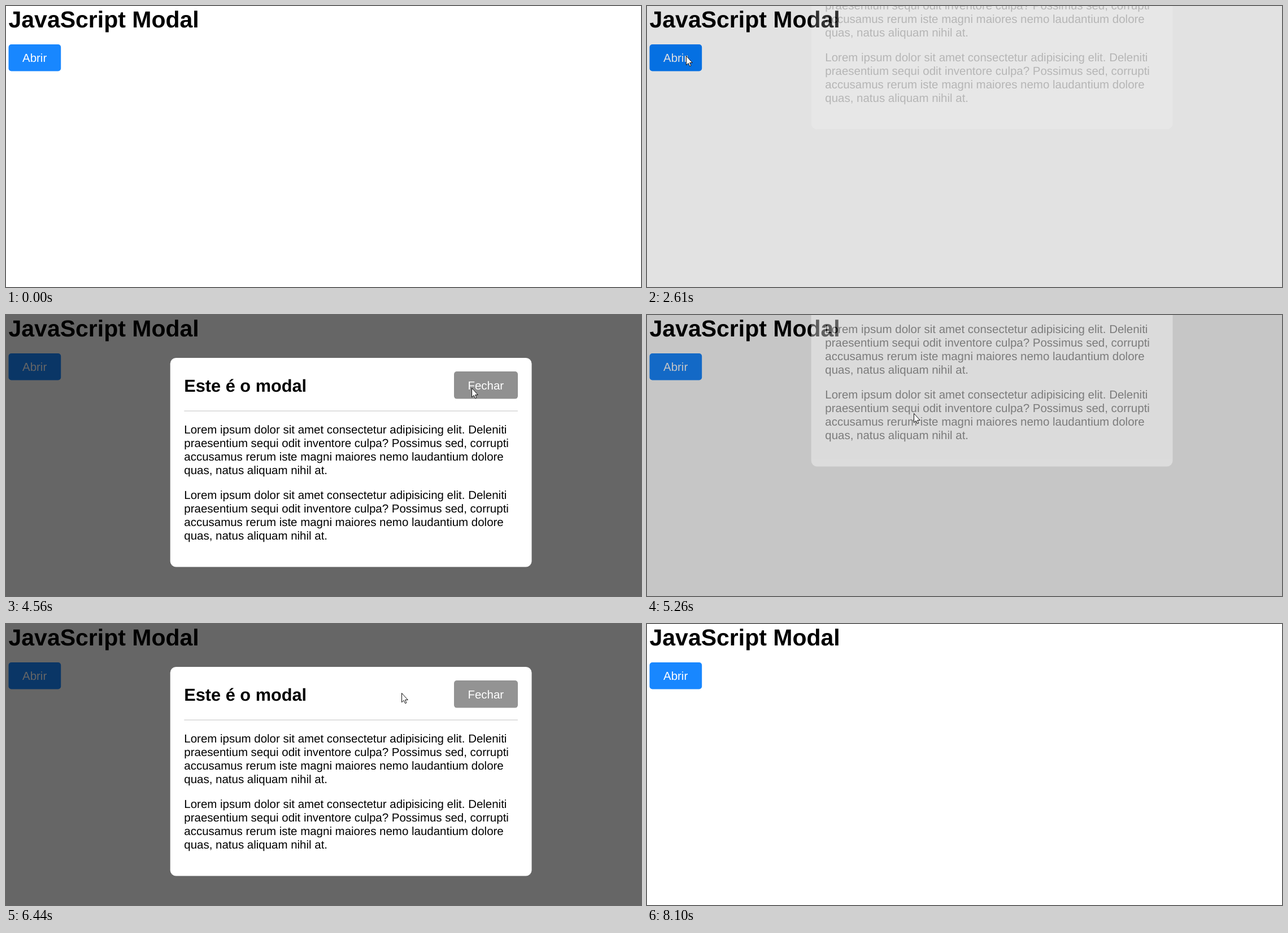
Recreate the animation shown at these times as an HTML page. Size 1124x498 px, loop 9.03 s.

```html
<!DOCTYPE html>
<html lang="pt">
<head>
<meta charset="utf-8">
<title>JavaScript Modal</title>
<style>
html, body { margin: 0; width: 100%; height: 100%; overflow: hidden; background: #fff; }
svg { display: block; width: 1124px; height: 498px; }
text { font: 20.48px "Liberation Sans", Arial, sans-serif; text-rendering: geometricPrecision; }
.h1 { font-size: 41px; font-weight: bold; }
.h2 { font-size: 30.72px; font-weight: bold; }
.label { fill: #fff; }
</style>
</head>
<body>
<svg viewBox="0 0 1124 498">
  <text class="h1" x="4.5" y="38">JavaScript Modal</text>
  <g id="open">
    <rect x="4.5" y="68" width="92.7" height="47.5" rx="5" fill="#007bff"/>
    <text class="label" x="29" y="99">Abrir</text>
  </g>
  <rect id="fade" width="1124" height="498" fill="#000"/>
  <g id="modal">
    <rect x="290.7" y="76" width="639.8" height="370.5" rx="10.2" fill="#fff"/>
    <text class="h2" x="315.3" y="136">Este é o modal</text>
    <g id="close">
      <rect x="793" y="100" width="113" height="48.6" rx="5" fill="#888"/>
      <text class="label" x="817.4" y="132">Fechar</text>
    </g>
    <rect x="315.3" y="169.5" width="590.6" height="1.2" fill="#ccc"/>
    <g id="body"></g>
  </g>
  <path id="cursor" d="M0 0V16.2L3.7 12.9 6.1 18.2 8.4 17.2 6.1 12H10.8Z" fill="#fff" stroke="#111"/>
</svg>
<script>
const LOOP = 9030;
const TICK = 69.6;             // the screen updates about 14 times a second
const OPEN = 2533, CLOSE = 5072, REOPEN = 5960, RECLOSE = 6940;

const $ = id => document.getElementById(id);
const set = (id, name, value) => $(id).setAttribute(name, value);

const lines = [
  'Lorem ipsum dolor sit amet consectetur adipisicing elit. Deleniti',
  'praesentium sequi odit inventore culpa? Possimus sed, corrupti',
  'accusamus rerum iste magni maiores nemo laudantium dolore',
  'quas, natus aliquam nihil at.'
];
for (const top of [210, 326]) {
  lines.forEach((line, i) => {
    const el = document.createElementNS('http://www.w3.org/2000/svg', 'text');
    el.setAttribute('x', 315.3);
    el.setAttribute('y', top + 24 * i);
    el.textContent = line;
    $('body').append(el);
  });
}

// Pointer stops: time, x, y
const stops = [
  [250, 985, 486], [960, 503, 339], [1160, 503, 339], [2000, 50, 79],
  [2400, 69, 88], [OPEN + 500, 68, 88], [3440, 384, 148], [3800, 560, 172],
  [4600, 838, 127], [CLOSE, 828, 128], [5254, 472, 174], [5880, 57, 76],
  [6120, 57, 76], [6437, 699, 122], [6600, 838, 128], [RECLOSE, 838, 128],
  [7680, 869, 323], [7840, 869, 323], [8030, 1085, 454]
];

function pointAt(t) {
  const next = stops.findIndex(s => s[0] > t);
  const [t1, x1, y1] = stops.at(next);
  const [t0, x0, y0] = next > 0 ? stops[next - 1] : stops[0];
  const u = t1 > t0 ? Math.min(1, (t - t0) / (t1 - t0)) : 0;
  return [x0 + (x1 - x0) * u, y0 + (y1 - y0) * u];
}

// CSS "ease": cubic-bezier(.25, .1, .25, 1)
function ease(x) {
  if (x <= 0) return 0;
  if (x >= 1) return 1;
  const bez = (s, p, q) => 3 * (1 - s) * (1 - s) * s * p + 3 * (1 - s) * s * s * q + s * s * s;
  let lo = 0, hi = 1;
  for (let i = 0; i < 24; i++) {
    const mid = (lo + hi) / 2;
    if (bez(mid, .25, .25) < x) lo = mid; else hi = mid;
  }
  return bez(lo, .1, 1);
}

// A transition switched on and off; an early reversal is shortened
function toggle(t, ms, spans) {
  let v = 0;
  for (const [on, off] of spans) {
    if (t < on) break;
    const up = ease((Math.min(t, off) - on) / ms);
    v = t > off ? up * (1 - ease((t - off) / (ms * up))) : up;
  }
  return v;
}

const hover = (t, ...spans) => .9 + .1 * toggle(t, 400, spans);

function draw(now) {
  const t = Math.floor((now - OPEN - 7) / TICK) * TICK + OPEN + 7;
  const p = toggle(t, 500, [[OPEN, CLOSE], [REOPEN, RECLOSE]]);
  set('fade', 'opacity', .6 * p);
  set('modal', 'opacity', p);
  set('modal', 'transform', `translate(0 ${Math.round(-282.5 * (1 - p))})`);
  set('open', 'opacity', hover(t, [1820, OPEN], [5780, REOPEN]));
  set('close', 'opacity', hover(t, [4480, CLOSE], [6550, RECLOSE]));
  const [x, y] = pointAt(t).map(Math.round);
  set('cursor', 'transform', `translate(${x + .5} ${y + .5})`);
  set('cursor', 'visibility', now >= 250 && now < 8095 ? 'visible' : 'hidden');
}

const begin = performance.now();
function frame() {
  draw((performance.now() - begin) % LOOP);
  requestAnimationFrame(frame);
}
frame();
</script>
</body>
</html>
```
